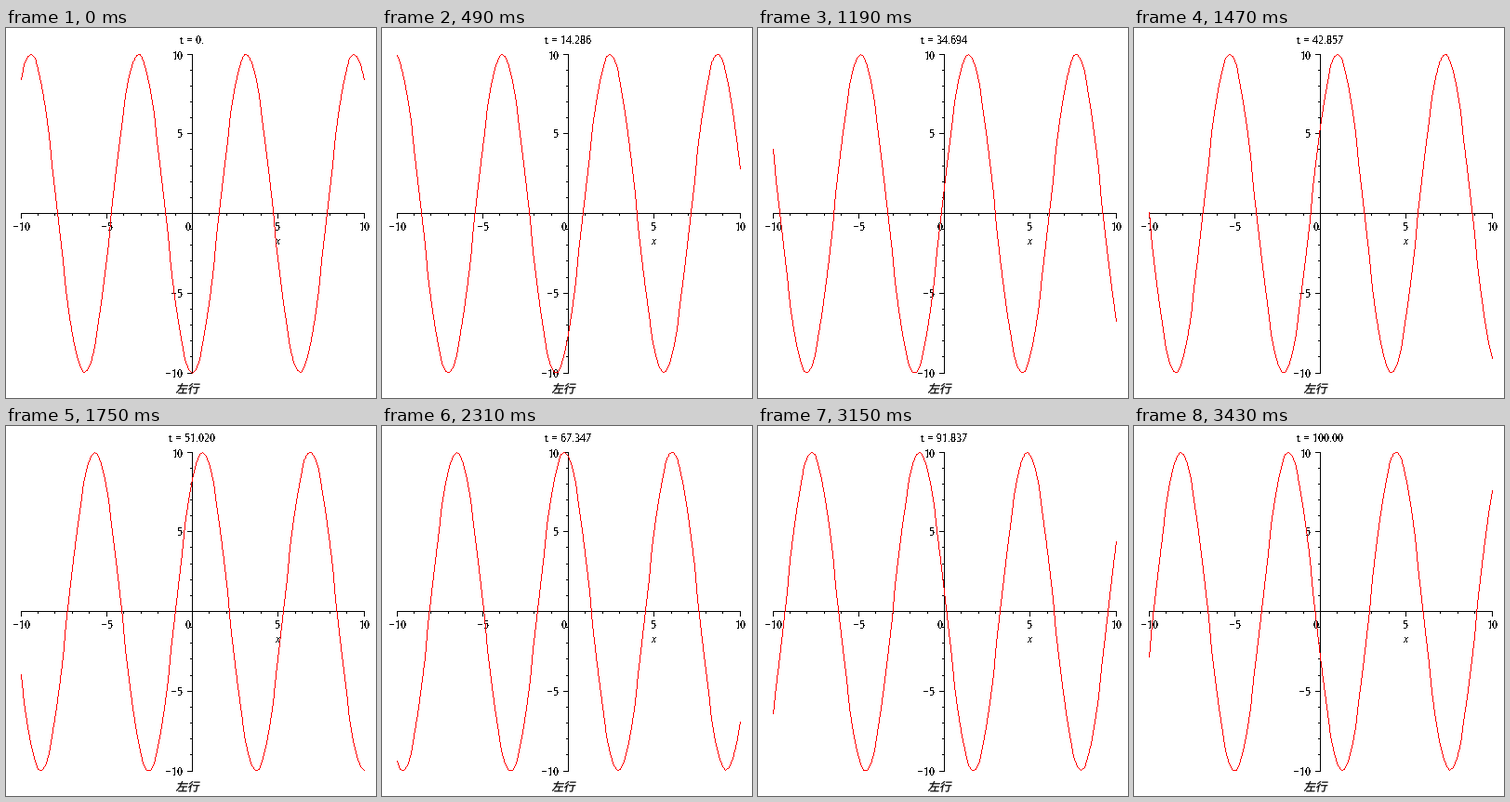
Animation, 398 px wide and 398 px high, one loop 3.5 s. Source, as a matplotlib script:

```python
import numpy as np
import matplotlib.pyplot as plt
from matplotlib.animation import FuncAnimation
from matplotlib.patches import PathPatch
from matplotlib.textpath import TextPath
from matplotlib.transforms import Affine2D

SIZE, DPI = 398, 100
FRAMES, INTERVAL = 50, 70
LEFT, RIGHT, TOP, BOTTOM = 16, 385, 28, 371
BLACK, RED = (0, 0, 0, 255), (255, 0, 0, 255)

plt.rcParams.update({
    "font.family": "Liberation Serif",
    "text.hinting": "native",
    "text.hinting_factor": 1,
    "text.antialiased": False,
})

fig = plt.figure(figsize=(SIZE / DPI, SIZE / DPI), dpi=DPI, facecolor="white")
ax = fig.add_axes([0, 0, 1, 1])
ax.axis("off")


def col(x):
    return np.floor(LEFT + (x + 10) * (RIGHT - LEFT) / 20 + 1e-9).astype(int)


def row(y):
    return np.floor(TOP + (10 - y) * (BOTTOM - TOP) / 20 + 1e-9).astype(int)


def blank():
    return np.zeros((SIZE, SIZE, 4), np.uint8)


def trace(layer, cols, rows, color):
    """Draw a crisp one-pixel polyline."""
    for x0, y0, x1, y1 in zip(cols, rows, cols[1:], rows[1:]):
        steps = max(abs(x1 - x0), abs(y1 - y0)) + 1
        xs = np.rint(np.linspace(x0, x1, steps)).astype(int)
        ys = np.rint(np.linspace(y0, y1, steps)).astype(int)
        layer[ys, xs] = color


def show(layer, zorder):
    return ax.imshow(layer, extent=(0, SIZE, SIZE, 0), aspect="auto",
                     interpolation="nearest", zorder=zorder)


def label(x, y, text, ha="center", **kw):
    return ax.text(x, y, text, ha=ha, va="baseline",
                   fontsize=12.03 * 72 / DPI, **kw)


axes_layer = blank()
x0, y0 = col(0), row(0)
trace(axes_layer, [LEFT, RIGHT], [y0, y0], BLACK)
trace(axes_layer, [x0, x0], [TOP, BOTTOM], BLACK)

for n in range(-10, 11):
    major = n % 5 == 0
    length = 5 if major else 2
    cx, ry = col(n), row(n)
    trace(axes_layer, [cx, cx], [y0, y0 + length], BLACK)
    trace(axes_layer, [x0 - length, x0], [ry, ry], BLACK)
    if major:
        text = str(n).replace("-", "\u2212")
        label(cx + 0.5 if n else 195.5, 218.5, text)
        if n:
            label(190.5, ry + 5.5, text, ha="right")

show(axes_layer, 1)
label(292.5, 233, "x", style="italic")
title = label(200, 17, "")

# Slanted caption
caption = TextPath((0, 0), "左行", size=12.5, prop={"family": "Noto Sans CJK JP"})
slant = Affine2D().skew(0.2, 0).scale(1, -1).translate(182.5, 392.5)
ax.add_patch(PathPatch(slant.transform_path(caption), color="black", lw=0.2))

x = np.linspace(-10, 10, 99)
curve = show(blank(), 5)


def update(i):
    t = 100 * i / (FRAMES - 1)
    layer = blank()
    trace(layer, col(x), row(-10 * np.cos(x + t / 20)), RED)
    curve.set_data(layer)
    title.set_text(f"t = {t:#.5g}" if i else "t = 0.")
    return curve, title


ax.set_xlim(0, SIZE)
ax.set_ylim(SIZE, 0)
anim = FuncAnimation(fig, update, frames=FRAMES, interval=INTERVAL,
                     init_func=lambda: update(0), repeat=True, repeat_delay=0)
plt.show()
```
